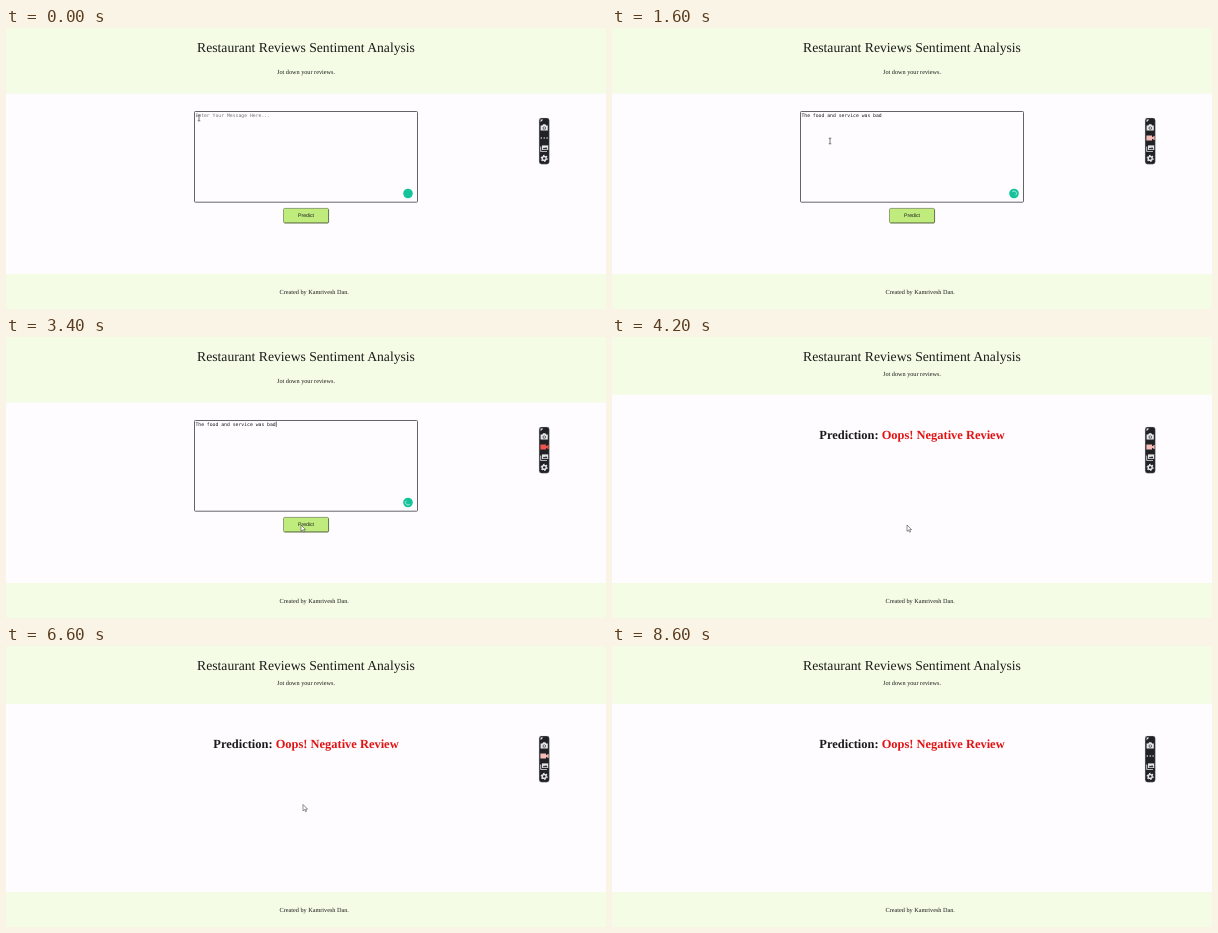
Animation of 600x281 px, one loop 8.7 s. Source, as an HTML page:

```html
<!DOCTYPE html>
<html lang="en">
<head>
<meta charset="utf-8">
<title>Restaurant Reviews Sentiment Analysis</title>
<style>
  html, body { margin: 0; width: 100%; height: 100%; overflow: hidden; background: #fefcff; }
  svg { display: block; width: 100vw; height: 100vh; }
  text { font-family: "Liberation Serif", "Times New Roman", serif; fill: #1a1a1a; white-space: pre; text-rendering: geometricPrecision; }
  .title { font-size: 13.65px; }
  .small { font-size: 6.22px; }
  .result { font-size: 12.45px; font-weight: bold; }
  .mono { font: 4.78px "DejaVu Sans Mono", monospace; }
  .button { font: 5.15px "Liberation Sans", Arial, sans-serif; }
  .mid { text-anchor: middle; }
</style>
</head>
<body>
<svg viewBox="0 0 600 281">
  <rect width="600" height="281" fill="#fefcff"/>
  <rect id="header" width="600" height="65.5" fill="#f4fce5"/>
  <rect y="246" width="600" height="35" fill="#f4fce5"/>
  <text class="title mid" x="300" y="24">Restaurant Reviews Sentiment Analysis</text>
  <text id="subtitle" class="small mid" x="300" y="46">Jot down your reviews.</text>
  <text class="small" x="273.5" y="265.8">Created by Kamrivesh Dan.</text>

  <g id="form">
    <rect x="188.5" y="83.5" width="223" height="90.7" rx=".8" fill="#fefcff" stroke="#63646a" stroke-width="1"/>
    <text id="message" class="mono" x="189.4" y="89"></text>
    <rect id="caret" y="84.6" width=".6" height="5.4" fill="#222"/>
    <circle cx="402" cy="165.5" r="4.8" fill="#15c39a"/>
    <path id="spinner" d="M402 163A2.5 2.5 0 0 1 402 168" fill="none" stroke="#d8f5ec" stroke-width=".7"/>
    <rect x="277.5" y="180.4" width="45" height="14.5" rx="1.2" fill="#bfec7c" stroke="#7c8f5c" stroke-width=".8"/>
    <path d="M278.5 195H321.5Q322.6 195 322.6 194V181.5" fill="none" stroke="#4d5c3a" stroke-width=".6"/>
    <text class="button mid" x="300" y="189.2">Predict</text>
  </g>

  <text id="result" class="result mid" x="300" y="102">Prediction: <tspan fill="#e01212">Oops! Negative Review</tspan></text>

  <g id="toolbar">
    <rect x="533.1" y="90" width="10.2" height="46.2" rx="2.4" fill="#202225" stroke="#b9b9bd" stroke-width=".3"/>
    <path d="M534.6 91.6H537.2L534.6 94.2Z" fill="#eee"/>
    <g fill="#e6e6e8">
      <path d="M534.6 97.4H536.3L537 96.3H539.4L540.1 97.4H541.8V102.6H534.6Z"/>
      <path d="M536 117.4H542.2V122H536Z"/>
      <path d="M534.3 118.6H535.2V122.9H541V123.7H534.3Z"/>
      <circle cx="538.2" cy="130.4" r="2.7"/>
      <circle cx="538.2" cy="130.4" r="3" fill="none" stroke="#e6e6e8" stroke-width="1.1" stroke-dasharray="1.5 1.64"/>
    </g>
    <g fill="#202225">
      <circle cx="538.2" cy="100" r="1.6"/>
      <path d="M536.6 121.2L538 119.4L539 120.4L540 119.1L541.6 121.2Z"/>
      <circle cx="538.2" cy="130.4" r="1.2"/>
    </g>
    <circle cx="538.2" cy="100" r=".9" fill="#e6e6e8"/>
    <g id="dots" fill="#eee">
      <circle cx="535.3" cy="110" r=".7"/><circle cx="538.2" cy="110" r=".7"/><circle cx="541.1" cy="110" r=".7"/>
    </g>
    <path id="camera" d="M534.4 107.4H540V109.3L542.6 107.8V112.2L540 110.7V112.6H534.4Z"/>
  </g>

  <g id="pointer">
    <path id="beam" d="M-1.3-2.8H1.3M0-2.8V2.8M-1.3 2.8H1.3" fill="none" stroke="#444" stroke-width=".7"/>
    <path id="arrow" d="M0 0V6.3L1.5 5L2.6 7.2L3.6 6.7L2.6 4.6H4.5Z" fill="#fff" stroke="#444" stroke-width=".6"/>
  </g>
</svg>
<script>
const LOOP = 8700, STEP = 100, SUBMIT = 4200;
const REVIEW = "The food and service was bad";
const CHAR_WIDTH = 2.878;

// time, x, y
const POINTER_PATH = [
  [0, 193, 90], [1300, 193, 90], [1600, 218, 113], [2100, 272, 169],
  [2500, 300, 196], [3000, 295, 188], [4800, 295, 188],
  [5200, 255, 165], [5700, 327, 121], [6200, 268, 146], [6600, 297, 158.5],
  [6800, 284, 173], [7500, 28, 44], [7900, 15, 12], [8200, 18, 2]
];
const RED_STARTS = [300, 800, 1300, 1800, 2300, 2800, 3300, 3800, 4400, 4900, 5600, 6200, 6700, 7200, 7700, 8200];
const RED_LENGTH = 200;

const el = id => document.getElementById(id);
const show = (id, on) => el(id).setAttribute("visibility", on ? "visible" : "hidden");
const clamp = (v, lo, hi) => Math.max(lo, Math.min(hi, v));

function pointerAt(t) {
  const next = POINTER_PATH.findIndex(p => p[0] > t);
  if (next < 0) return POINTER_PATH.at(-1).slice(1);
  const [t0, x0, y0] = POINTER_PATH[next - 1], [t1, x1, y1] = POINTER_PATH[next];
  const k = (t - t0) / (t1 - t0);
  return [x0 + (x1 - x0) * k, y0 + (y1 - y0) * k];
}

function drawForm(t) {
  const typed = Math.round(REVIEW.length * clamp((t - 300) / 900, 0, 1));
  const editing = t < SUBMIT && typed > 0;
  el("message").textContent = typed ? REVIEW.slice(0, typed) : "Enter Your Message Here...";
  el("message").style.fill = typed ? "#1a1a1a" : "#777";
  el("caret").setAttribute("x", 189.3 + typed * CHAR_WIDTH);
  show("caret", editing && (t <= 1200 || t % 500 >= 250));
  show("spinner", editing);
  el("spinner").setAttribute("transform", `rotate(${t / 2 - 125} 402 165.5)`);
}

function drawPointer(t) {
  const [x, y] = pointerAt(t);
  const overText = t < SUBMIT && y < 174;
  el("pointer").setAttribute("transform", `translate(${x} ${y})`);
  show("beam", overText);
  show("arrow", !overText && t < 8300);
}

function drawRecorder(t) {
  const idle = t < 100 || t >= 8600;
  const red = RED_STARTS.some(s => t >= s && t < s + RED_LENGTH);
  show("dots", idle);
  show("camera", !idle);
  el("camera").setAttribute("fill", red ? "#ee5550" : "#f6bcb8");
}

function draw(time) {
  const t = Math.floor((time % LOOP) / STEP) * STEP;
  const submitted = t >= SUBMIT;
  el("header").setAttribute("height", submitted ? 57.8 : 65.5);
  el("subtitle").setAttribute("y", submitted ? 39 : 46);
  show("form", !submitted);
  show("result", submitted);
  drawForm(t);
  drawPointer(t);
  drawRecorder(t);
}

const start = performance.now();
function tick() {
  draw(performance.now() - start);
  requestAnimationFrame(tick);
}
tick();
</script>
</body>
</html>
```
